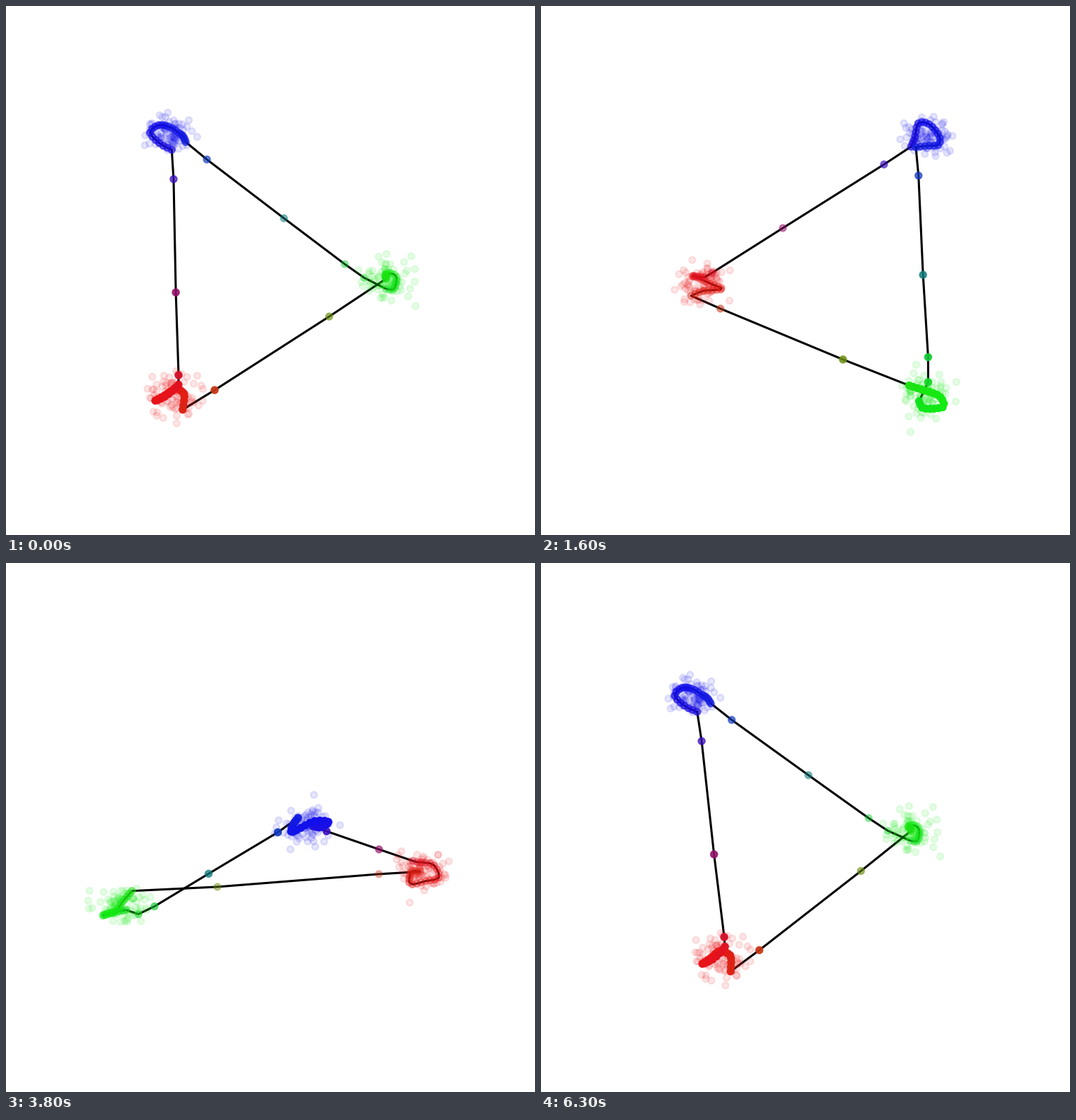
Write a matplotlib script that moves like this. It is 748 px wide and 748 px high and loops after 6400 ms.

```python
import numpy as np
import matplotlib.pyplot as plt
from matplotlib.animation import FuncAnimation

SIZE = 748
DPI = 110
FRAMES = 64
CX, CY = 383.8, 378
ELEV = np.radians(30)
DIST = 3900

BASES = np.array([(0.07, 0.06, 0.93), (0.07, 0.93, 0.07), (0.93, 0.07, 0.08)])


def smooth_path(points, count):
    """Catmull-Rom curve through the points, resampled evenly by length."""
    p = np.array(points, float)
    p = np.vstack([2 * p[0] - p[1], p, 2 * p[-1] - p[-2]])
    s = np.linspace(0, 1, 30, endpoint=False)[:, None]
    parts = []
    for a, b, c, d in zip(p, p[1:], p[2:], p[3:]):
        parts.append(0.5 * (2 * b + (c - a) * s
                            + (2 * a - 5 * b + 4 * c - d) * s ** 2
                            + (3 * b - a - 3 * c + d) * s ** 3))
    curve = np.vstack(parts + [p[-2:-1]])
    steps = np.linalg.norm(np.diff(curve, axis=0), axis=1)
    length = np.concatenate([[0], np.cumsum(steps)])
    at = np.linspace(0, length[-1], count)
    return np.column_stack([np.interp(at, length, axis) for axis in curve.T])


def mix(t):
    """Colour at loop position t: 0 blue, 1 green, 2 red, 3 blue again."""
    t = np.asarray(t) % 3
    low = t.astype(int)
    f = (t - low)[:, None]
    return BASES[low] * (1 - f) + BASES[(low + 1) % 3] * f


def project(points, azim):
    """Screen x, y and nearness of points given as (right, toward, up)."""
    u0, d0, z = points.T
    u = u0 * np.cos(azim) - d0 * np.sin(azim)
    d = d0 * np.cos(azim) + u0 * np.sin(azim)
    near = d * np.cos(ELEV) + z * np.sin(ELEV)
    scale = DIST / (DIST - near)
    x = CX + u * scale
    y = CY - (z * np.cos(ELEV) - d * np.sin(ELEV)) * scale
    return np.column_stack([x, y]), near


# Nodes of the closed curve: three bundles joined by a few single nodes.
blue_start = np.array([-151.8, -142, 122.9])
green_start = np.array([99.6, -161.6, -77.6])
red_end = np.array([-136.6, 147, -77.6])

blue = blue_start + smooth_path(
    [(0, 0, 0), (-17, -6, 7), (-31, -11, 22), (-19, -26, 26.5),
     (-3, -40, 16), (9, -39, 7.5), (16, -23, 9.7), (20, -6, 9.5)], 21)
green = green_start + smooth_path(
    [(61, 14, -34), (73, 8, -38), (78, -17.5, -33), (71, -18, -26.6),
     (61, -11, -23.6), (61, 8, -16), (60, 28, -9)], 19)
red = red_end + smooth_path(
    [(6, 32, -36), (8, 14, -26.5), (5, 1, -27), (-5.5, -13.6, -30.7),
     (-19, 4, -30), (-32, 21.6, -28), (-18, 30, -16), (-7, 21, -11),
     (0, 12, -8)], 22)

parts = [
    (blue, np.linspace(-0.06, 0.06, len(blue))),
    ([(-101.8, -151.4, 102.3), (9.5, -156, 3)], [0.2, 0.5]),
    ([green_start, green_start + (29, 0.5, -23)], [0.85, 0.92]),
    (green, np.linspace(0.95, 1.05, len(green))),
    ([(74.8, -43, -96.9), (-87.4, 134.5, -110)], [1.42, 1.83]),
    (red, np.linspace(1.92, 2.06, len(red))),
    ([red_end, (-142.4, 43.2, -5.9), (-148.4, -103.3, 95.8)],
     [2.1, 2.4, 2.8]),
]
nodes = np.vstack([p for p, _ in parts])
node_rgb = mix(np.concatenate([t for _, t in parts]))
loop = np.append(np.arange(len(nodes)), 0)

# Data clouds around the three bundles.
rng = np.random.default_rng(11)
PER_CLOUD = 85
centres = [(-158.5, -162, 135), (161.8, -156.4, -100), (-144, 165, -101)]
cloud = np.vstack([c + rng.normal(size=(PER_CLOUD, 3)).clip(-2.5, 2.5)
                   * (17, 17, 13.5) for c in centres])
cloud_rgba = np.column_stack([np.repeat(BASES, PER_CLOUD, axis=0),
                              np.full(len(cloud), 0.1)])

fig = plt.figure(figsize=(SIZE / DPI, SIZE / DPI), dpi=DPI, facecolor="white")
ax = fig.add_axes([0, 0, 1, 1])
ax.set(xlim=(0, SIZE), ylim=(SIZE, 0))
ax.axis("off")

line, = ax.plot([], [], color="black", lw=2, zorder=1)
cloud_dots = ax.scatter(*cloud[:, :2].T, s=36, lw=1.5, zorder=2)
node_dots = ax.scatter(*nodes[:, :2].T, s=36, lw=1.5, zorder=3)


def update(i):
    azim = 2 * np.pi * i / FRAMES

    xy, near = project(cloud, azim)
    order = np.argsort(near)
    cloud_dots.set_offsets(xy[order])
    cloud_dots.set_facecolor(cloud_rgba[order])

    xy, near = project(nodes, azim)
    line.set_data(*xy[loop].T)
    order = np.argsort(near)
    # Far nodes fade to 30 percent.
    alpha = 0.3 + 0.7 * (near - near.min()) / np.ptp(near)
    node_dots.set_offsets(xy[order])
    node_dots.set_facecolor(np.column_stack([node_rgb, alpha])[order])
    return line, cloud_dots, node_dots


anim = FuncAnimation(fig, update, frames=FRAMES, interval=100,
                     repeat=True, repeat_delay=0)
plt.show()
```
